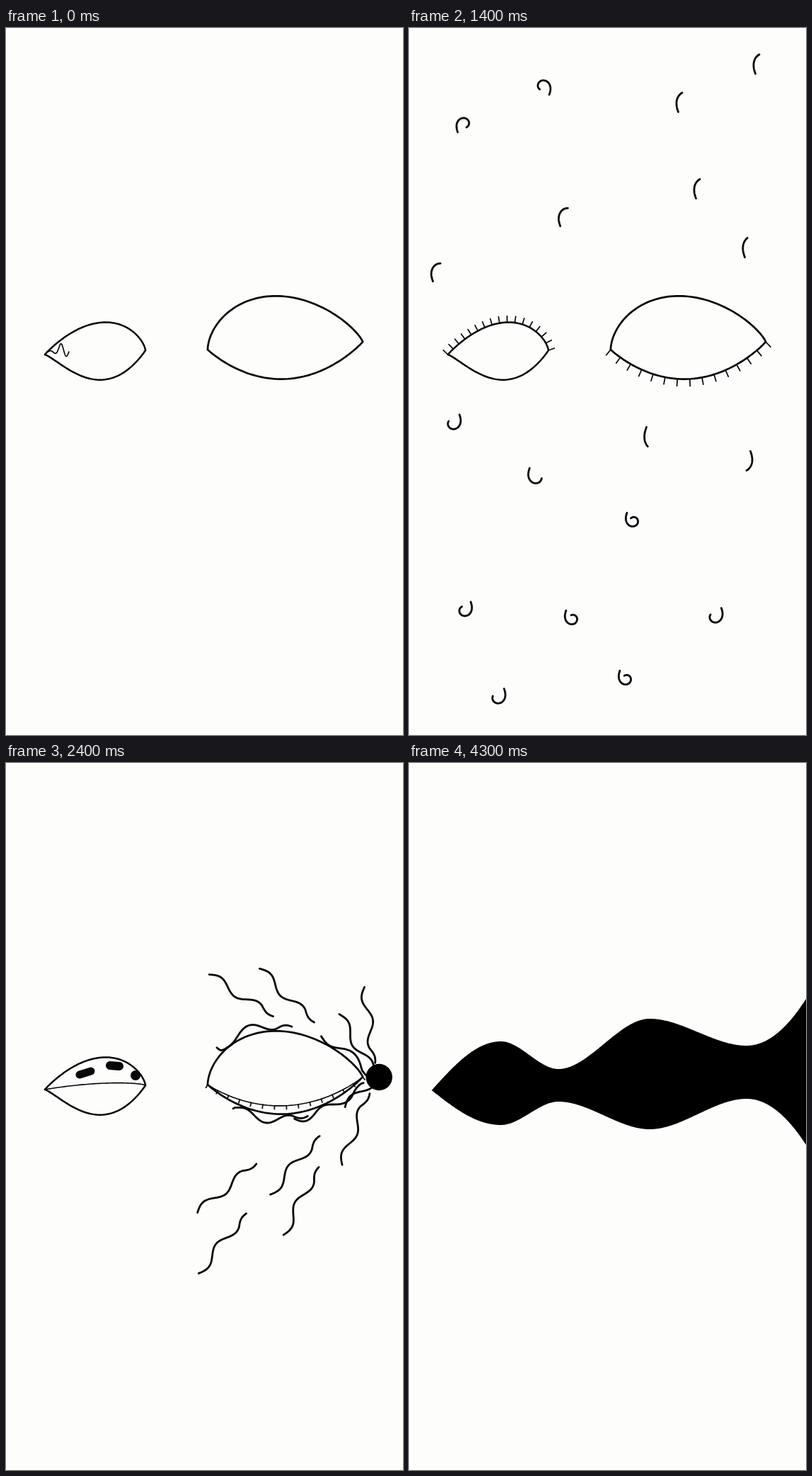
Write an HTML page with a canvas that moves like this. It is 561 px wide and 998 px high and loops after 4400 ms.

```html
<!DOCTYPE html>
<html lang="en">
<head>
<meta charset="utf-8">
<title>Eyes</title>
<style>
html, body { margin: 0; width: 100%; height: 100%; overflow: hidden; background: #fdfdfc; }
canvas { display: block; }
</style>
</head>
<body>
<canvas id="stage" width="561" height="998"></canvas>
<script>
const ctx = document.getElementById('stage').getContext('2d');
const INK = '#07070a', PAPER = '#fdfdfc';
const W = 561, H = 998, STEP = 100, STEPS = 44;
const HUB = [525, 443];

const clamp = (v, a = 0, b = 1) => Math.min(b, Math.max(a, v));
const lerp = (a, b, t) => a + (b - a) * t;
const smooth = t => t * t * (3 - 2 * t);
const dist = (a, b) => Math.hypot(b[0] - a[0], b[1] - a[1]);
const rad = deg => deg * Math.PI / 180;
const range = (n, f) => Array.from({ length: n + 1 }, (_, i) => f(i / n, i));
const mix = (p, q, t) => p.map((a, i) => [lerp(a[0], q[i][0], t), lerp(a[1], q[i][1], t)]);

// Rows are [step, value]; the value runs linearly between rows.
function key(rows, k) {
  let i = 0;
  while (i < rows.length - 2 && k > rows[i + 1][0]) i++;
  const [a, b] = [rows[i], rows[i + 1]];
  return lerp(a[1], b[1], clamp((k - a[0]) / (b[0] - a[0])));
}

// n + 1 points spread evenly along a polyline.
function even(p, n) {
  const sum = [0];
  for (let i = 1; i < p.length; i++) sum.push(sum[i - 1] + dist(p[i - 1], p[i]));
  let i = 1;
  return range(n, t => {
    const d = sum[p.length - 1] * t;
    while (i < p.length - 1 && sum[i] < d) i++;
    return mix([p[i - 1]], [p[i]], clamp((d - sum[i - 1]) / (sum[i] - sum[i - 1] || 1)))[0];
  });
}

function trace(p) {
  ctx.beginPath();
  p.forEach(([x, y]) => ctx.lineTo(x, y));
}
function line(p, w) {
  trace(p);
  ctx.lineWidth = w;
  ctx.stroke();
}

// Pose values: x0, y0, x1, y1, rise, drop, line width. Rim powers shape each lid.
const LEFT = {
  top: [.95, .68], low: [1.25, .96],
  rest: [55, 461, 197, 455, 42, 39, 2.5], swell: [-27, 3, 41, -2, 19, 18, 1.5],
  lid: [[14, 1], [20, .13], [24, .13], [30, -1]],
  lash: [[6, 0], [12, 9], [14, 9], [19, 0]],
  lashes: 16, side: 1,
  spots: [[104, 440, 120, 435, 11], [147, 427, 160, 428, 12], [183, 441, 183, 441, 14]]
};
const RIGHT = {
  top: [.56, .8], low: [.95, .93],
  rest: [285, 454, 504, 443, 71, 47, 2.7], swell: [6, 1, -36, 4, -14, -8, -.7],
  lid: [[14, -1], [20, .32], [24, -.75], [30, 1]],
  lash: [[6, 0], [12, 10], [14, 10], [20, 5], [24, 5], [29, 0]],
  lashes: 14, side: -1,
  spots: [[351, 427, 402, 427, 9], [361, 463, 361, 463, 22], [417, 456, 430, 453, 24]]
};

function pose(eye, k) {
  const s = k < 10 ? Math.sin(Math.PI * k / 10) : 0;
  return eye.rest.map((v, i) => v + s * eye.swell[i]);
}
function hump(u, [p, q]) {
  const m = p / (p + q);
  return (u / m) ** p * ((1 - u) / (1 - m)) ** q;
}
// Height at u of a lid: v = 1 is the upper rim, v = -1 the lower one.
function rimY(eye, e, v, u) {
  const h = v > 0 ? e[4] * hump(u, eye.top) : e[5] * hump(u, eye.low);
  return lerp(e[1], e[3], u) - v * h;
}
function rim(eye, e, v) {
  return range(80, t => {
    const u = (1 - Math.cos(Math.PI * t)) / 2;
    return [lerp(e[0], e[2], u), rimY(eye, e, v, u)];
  });
}

function drawEye(eye, k) {
  const e = pose(eye, k), v = key(eye.lid, k), lash = key(eye.lash, k);
  const lid = rim(eye, e, v);
  if (k > 14) {
    ctx.save();
    trace(rim(eye, e, eye.side).concat(lid.slice().reverse()));
    ctx.clip();
    const grow = 18 * Math.max(0, k - 24);
    eye.spots.forEach(([x0, y0, x1, y1, w]) => line([[x0, y0], [x1, y1]], w + grow));
    ctx.restore();
    line(lid, 1.6);
  }
  line(rim(eye, e, 1), e[6]);
  line(rim(eye, e, -1), e[6]);
  if (!lash) return;

  const p = even(lid, eye.lashes), s = Math.sign(v) * lash;
  p.forEach((q, i) => {
    const a = p[Math.max(0, i - 1)], b = p[Math.min(eye.lashes, i + 1)], l = dist(a, b);
    line([q, [q[0] + s * (b[1] - a[1]) / l, q[1] - s * (b[0] - a[0]) / l]], 1.7);
  });
}

// Pulse line that runs through the left eye: written from the left, then erased.
function drawPulse(k) {
  const e = pose(LEFT, k), s = (e[2] - e[0]) / 210;
  const head = Math.min(208, 50 + 21 * k), tail = Math.max(4, 52 * (k - 8));
  if (tail >= head) return;
  line(range(160, t => {
    const x = lerp(tail, head, t);
    const beat = 9 + 15 * Math.exp(-(((x - 90) / 14) ** 2)) + 6 * Math.exp(-(((x - 38) / 12) ** 2));
    const y = -6 - .08 * x - beat * clamp((x - 8) / 25) * Math.cos(2 * Math.PI * (x - 33) / 24.7);
    return [e[0] + x * s, e[1] + y * s];
  }), 1 + s);
}

// Strands: curls [x, y, turn] that unroll and swim to the hub.
const CURLS = [
  [76, 137, 260], [191, 84, -250], [382, 105, 80], [491, 51, 80], [218, 267, 110], [38, 345, 110],
  [407, 227, 80], [475, 310, 70], [64, 556, 230], [178, 632, -190], [335, 577, -60], [481, 611, 80],
  [315, 694, -330], [434, 829, 230], [80, 820, 260], [229, 832, -310], [127, 943, 220], [305, 917, -320]
];
const N = 40, BODY = 108;

function curl([x, y, turn]) {
  const len = 24 + Math.abs(turn) * .08;
  const start = (y < HUB[1] ? -90 : 90) - 20 * Math.sign(turn);
  let px = 0, py = 0;
  const p = range(N, t => {
    const a = rad(start + turn * t ** 1.6);
    px += Math.cos(a) * len / N;
    py += Math.sin(a) * len / N;
    return [px, py];
  });
  const mid = c => {
    const all = p.map(q => q[c]);
    return (Math.min(...all) + Math.max(...all)) / 2;
  };
  const mx = mid(0), my = mid(1);
  return p.map(q => [q[0] - mx + x, q[1] - my + y]);
}

// Path to the hub that sets out a little steeper than the straight way.
function route([x, y]) {
  const reach = dist([x, y], HUB);
  const a = clamp(1.18 * Math.atan2(HUB[1] - y, HUB[0] - x), -Math.PI / 2, Math.PI / 2);
  const cx = x + reach / 2 * Math.cos(a), cy = y + reach / 2 * Math.sin(a);
  const bend = (p, c, q, t) => lerp(lerp(p, c, t), lerp(c, q, t), t);
  const path = even(range(100, t => [bend(x, cx, HUB[0], t), bend(y, cy, HUB[1], t)]), 100);
  return { path, unit: dist(path[50], path[51]), a };
}

const EYE = pose(RIGHT, 20);

// Point on the route, kept outside the right eye.
function along({ path, unit, a }, d) {
  if (d < 0) return [path[0][0] + d * Math.cos(a), path[0][1] + d * Math.sin(a)];
  const f = Math.min(d / unit, 99.999), i = Math.floor(f);
  let [[x, y]] = mix([path[i]], [path[i + 1]], f - i);
  const u = (x - EYE[0]) / (EYE[2] - EYE[0]);
  if (u > 0 && u < 1) {
    y = path[0][1] < HUB[1] ? Math.min(y, rimY(RIGHT, EYE, 1, u) - 8)
      : Math.max(y, rimY(RIGHT, EYE, -1, u) + 8);
  }
  return [x, y];
}

function snake(way, d, side) {
  return range(N, t => {
    const s = d + BODY * (.5 - t);
    const [x, y] = along(way, s), b = along(way, s + 4), c = along(way, s - 4);
    const l = dist(b, c) || 1;
    const o = side * 6 * Math.sin(Math.PI * 3.4 * (1 - t)) * clamp(t * 5);
    return [x - (b[1] - c[1]) / l * o, y + (b[0] - c[0]) / l * o];
  });
}

const STRANDS = CURLS.map((c, i) => ({
  curl: curl(c), way: route(c), side: Math.floor(i / 3) % 2 ? 1 : -1
}));

function drawStrands(k) {
  if (k < 6) return;
  const travel = k < 20 ? 148 * ((k - 14) / 6) ** 2 : 148 + 43 * (k - 20);
  STRANDS.forEach(({ curl, way, side }) => {
    if (k <= 14) line(curl.slice(0, Math.ceil(N * clamp((k - 5) / 6)) + 1), 2.8);
    else line(mix(curl, snake(way, travel, side), clamp((k - 14) / 4)), 2.8);
  });
}

function drawBall(k) {
  if (k < 20) return;
  const r = k <= 24 ? 5.5 + 3.3 * (k - 20) : 18.7 * 17 ** ((k - 24) / 6);
  ctx.beginPath();
  ctx.arc(518.5 - 2.5 * Math.min(4, k - 20) + r, 443.5, r, 0, 7);
  ctx.fill();
}

// Silhouette: outline of the separate eyes and the wall on the right.
function apartY(x, side) {
  let y = x < 100 ? 461 : 453;
  for (const eye of [LEFT, RIGHT]) {
    const e = eye.rest, u = (x - e[0]) / (e[2] - e[0]);
    if (u > 0 && u < 1) y = rimY(eye, e, side, u);
  }
  const t = (x - 497) / (W - 497);
  if (t < 0) return y;
  return side > 0 ? Math.min(y, 424 - 171 * t ** 2.2) : Math.max(y, 461 + 140 * t ** 1.15);
}

// Outline once everything has flowed together, eased between its crests and necks.
const CREST_X = [32, 130, 211, 340, 477, W];
const CREST_Y = { '1': [462, 393, 432, 361, 399, 333], '-1': [462, 511, 478, 517, 474, 539] };
function joinedY(x, side) {
  const i = clamp(CREST_X.findIndex(c => c > x) - 1, 0, 4) + (x >= W ? 4 : 0);
  const t = (x - CREST_X[i]) / (CREST_X[i + 1] - CREST_X[i]);
  const ease = i === 0 ? Math.sin(t * Math.PI / 2) : i === 4 ? t * t : smooth(t);
  return lerp(CREST_Y[side][i], CREST_Y[side][i + 1], ease);
}

function drawSilhouette(k) {
  const m = ((k - 31) / 12) ** 3, x0 = CREST_X[0];
  const wall = side => range(W - x0, (t, i) =>
    [x0 + i, lerp(apartY(x0 + i, side), joinedY(x0 + i, side), m)]);
  trace(wall(1).concat(wall(-1).reverse()));
  ctx.fill();
}

function draw(k) {
  ctx.fillStyle = PAPER;
  ctx.fillRect(0, 0, W, H);
  ctx.lineCap = ctx.lineJoin = 'round';
  ctx.strokeStyle = INK;
  ctx.fillStyle = '#000';
  if (k >= 31) return drawSilhouette(k);
  drawEye(LEFT, k);
  drawEye(RIGHT, k);
  drawPulse(k);
  drawStrands(k);
  drawBall(k);
}

const start = performance.now();
function tick() {
  draw(Math.floor((performance.now() - start) / STEP) % STEPS);
  requestAnimationFrame(tick);
}
tick();
</script>
</body>
</html>
```
